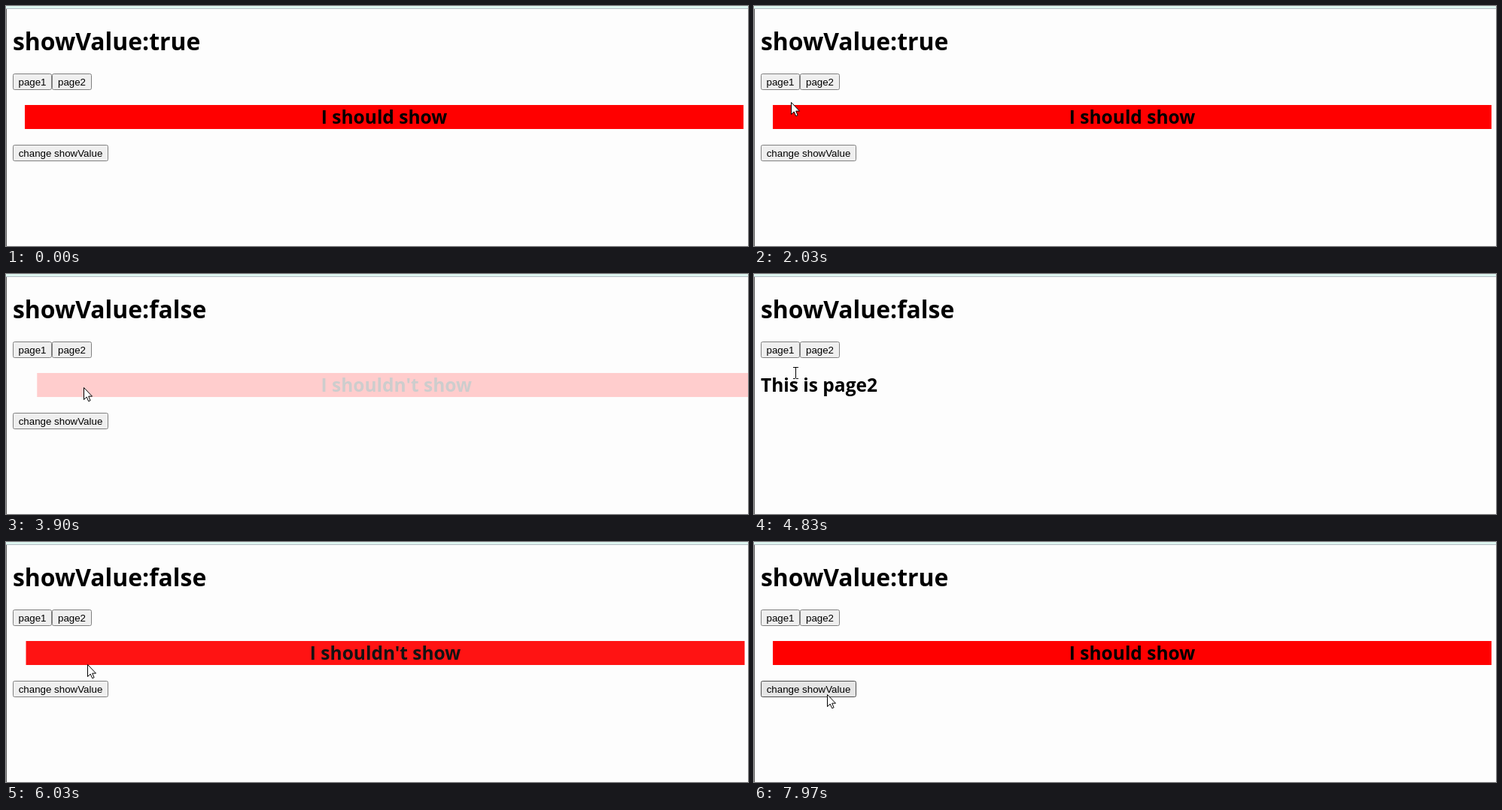
An HTML page with a canvas for the animation above (8000 ms loop, 986 by 320 pixels).

```html
<!DOCTYPE html>
<html lang="en">
<head>
<meta charset="utf-8">
<title>showValue demo</title>
<style>
  html, body { margin: 0; width: 100%; height: 100%; overflow: hidden; background: #fdfdfd; }
  canvas { display: block; }
</style>
</head>
<body>
<canvas id="stage" width="986" height="320"></canvas>
<script>
const ctx = document.getElementById('stage').getContext('2d');
const LOOP = 8000, SLIDE = 950, DWELL = 130;
const CLICK = { hide: 2720, page2: 3300, page1: 5285, show: 7200 };
const HEADING = 'bold 31.9px "Open Sans", "Noto Sans", sans-serif';
const SUBHEADING = 'bold 24.5px "Open Sans", "Noto Sans", sans-serif';
const LABEL = '13.333px "Liberation Sans", Arial, sans-serif';
const ARROW = new Path2D('M.5 .5v16l3.7-3.5 2.5 5.7 2.4-1-2.4-5.6h4.8z');

// Places the pointer visits; it dwells at each before moving on
const STOPS = [
  { at: 1050, x: 578, y: 320 },
  { at: 1750, x: 45, y: 119 },
  { at: 2600, x: 78, y: 196 },
  { at: 3300, x: 97, y: 107 },
  { at: 4170, x: 105, y: 170 },
  { at: 5233, x: 22, y: 105 },
  { at: 5560, x: 105, y: 162 },
  { at: 6000, x: 108, y: 163 },
  { at: 6650, x: 97, y: 203 }
];

const clamp = v => Math.min(1, Math.max(0, v));
const easeOut = p => 1 - (1 - clamp(p)) ** 1.67;
const smooth = p => p * p * (3 - 2 * p);

function pointerAt(t) {
  const from = STOPS.findLast(stop => stop.at <= t);
  if (!from) return null;
  const to = STOPS[STOPS.indexOf(from) + 1] || from;
  const start = from.at + DWELL;
  const s = to === from ? 0 : smooth(clamp((t - start) / (to.at - start)));
  return { x: from.x + (to.x - from.x) * s, y: from.y + (to.y - from.y) * s };
}

function rect(x, y, w, h, color) {
  ctx.fillStyle = color;
  ctx.fillRect(x, y, w, h);
}

function text(str, x, y, font, color = '#000', align = 'left') {
  ctx.font = font;
  ctx.fillStyle = color;
  ctx.textAlign = align;
  ctx.fillText(str, x, y);
}

function button(label, x, y, w, pointer) {
  const h = 22;
  const hover = pointer && pointer.x >= x && pointer.x < x + w && pointer.y >= y && pointer.y < y + h;
  ctx.beginPath();
  ctx.roundRect(x + .5, y + .5, w - 1, h - 1, 2);
  ctx.fillStyle = hover ? '#e5e5e5' : '#efefef';
  ctx.fill();
  ctx.strokeStyle = hover ? '#4f4f4f' : '#808080';
  ctx.stroke();
  text(label, x + w / 2, y + 16, LABEL, '#000', 'center');
}

// The bar slides 20px and fades as one group; k = 1 is fully gone
function bar(label, k) {
  const x = 25 + 20 * k, v = 253 * k;
  rect(x, 132, 955, 32, `rgb(255 ${v} ${v})`);
  text(label, x + 477.5, 157, SUBHEADING, `rgb(${v} ${v} ${v})`, 'center');
}

function arrow(x, y) {
  ctx.save();
  ctx.translate(Math.round(x), Math.round(y));
  ctx.fillStyle = '#fff';
  ctx.fill(ARROW);
  ctx.strokeStyle = '#000';
  ctx.stroke(ARROW);
  ctx.restore();
}

function beam(x, y) {
  x = Math.round(x);
  y = Math.round(y);
  rect(x, y - 7, 1, 15, '#000');
  for (const dy of [-7, 8]) {
    rect(x - 3, y + dy, 3, 1, '#000');
    rect(x + 1, y + dy, 3, 1, '#000');
  }
}

function draw(t) {
  const pointer = pointerAt(t);
  const shown = t < CLICK.hide || t >= CLICK.show;
  const onPage2 = t >= CLICK.page2 + SLIDE && t < CLICK.page1;

  rect(0, 0, 986, 320, '#fdfdfd');
  rect(0, 0, 986, 3, '#def5f0');
  rect(0, 3, 986, 1, '#b4bcc4');
  rect(0, 4, 1, 316, '#5c5c5c');

  text('showValue:' + shown, 9, 59, HEADING);
  button('page1', 9, 90, 52, pointer);
  button('page2', 61, 90, 53, pointer);

  if (onPage2) {
    text('This is page2', 9, 157, SUBHEADING);
  } else {
    const gone = t < CLICK.page1
      ? easeOut((t - CLICK.page2) / SLIDE)
      : 1 - easeOut((t - CLICK.page1) / SLIDE);
    bar(shown ? 'I should show' : "I shouldn't show", gone);
    button('change showValue', 9, 185, 127, pointer);
  }

  if (!pointer) return;
  const overText = onPage2 && pointer.x < 166 && pointer.y >= 130 && pointer.y < 165;
  (overText ? beam : arrow)(pointer.x, pointer.y);
}

function tick() {
  draw(performance.now() % LOOP);
  requestAnimationFrame(tick);
}
tick();
</script>
</body>
</html>
```
